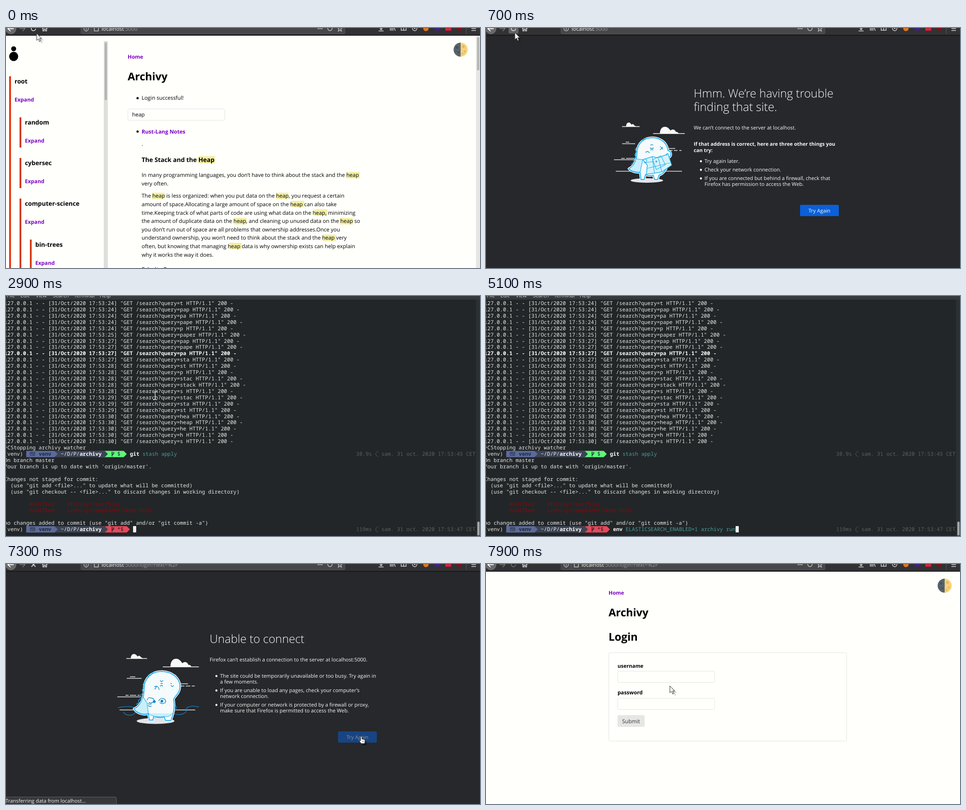
Recreate the animation shown at these times as an HTML page. Size 1052 by 532 pixels, loop 8000 ms.

```html
<!DOCTYPE html>
<html lang="en">
<meta charset="utf-8">
<title>Archivy session</title>
<style>
html, body { margin: 0; width: 100%; height: 100%; overflow: hidden; background: #27282b }
svg { display: block; width: 1052px; height: 532px }
text { font-family: "Open Sans", "Noto Sans", sans-serif; white-space: pre; text-rendering: geometricPrecision }
.mono { font: 500 11.625px "Noto Sans Mono", "DejaVu Sans Mono", monospace }
.mono.b { font-weight: 700 }
</style>
<svg id="stage" viewBox="0 0 1052 532"></svg>
<script>
const INK = '#000', PURPLE = '#7a00c4', PAPER = '#fffffc', DARK = '#27282b', WHITE = '#f9f9fa', BLUE = '#22b1ee';
const CELL = 6.975, ROW = 13.92;

const text = (x, y, size, str, fill = INK, weight = 400, more = '') =>
  `<text x="${x}" y="${y}" font-size="${size}" font-weight="${weight}" fill="${fill}" ${more}>${str}</text>`;
const rect = (x, y, w, h, fill, more = '') =>
  `<rect x="${x}" y="${y}" width="${w}" height="${h}" fill="${fill}" ${more}/>`;
const dot = (x, y, r, fill, more = '') => `<circle cx="${x}" cy="${y}" r="${r}" fill="${fill}" ${more}/>`;
const path = (d, stroke, width = 1, fill = 'none', more = '') =>
  `<path d="${d}" stroke="${stroke}" stroke-width="${width}" fill="${fill}" ${more}/>`;
const group = (id, body) => `<g id="${id}">${body}</g>`;
const field = (x, y, w, h) => rect(x + .5, y + .5, w - 1, h - 1, PAPER, 'rx="3" stroke="#e2e4e4"');

// ---------- light pages ----------
const moon = x => `<g transform="translate(${x} 48)">` + dot(0, 0, 15.6, '#f6d37c') +
  path('M0-15.6A15.6 15.6 0 0 0 0 15.6Z', 'none', 0, '#58636d') +
  [[-8, -5, 3], [-5, 6, 2.5], [-11, 3, 1.5]].map(([a, b, r]) => dot(a, b, r, '#46515b')).join('') +
  [[6, -7, 3], [9, 4, 2.3], [4, 9, 2]].map(([a, b, r]) => dot(a, b, r, '#e5b95c')).join('') + '</g>';

function folder(x, y, name, height) {
  return rect(x, y, 4, height, x < 10 ? '#e8340c' : '#d63c14') +
    text(x + 12, y + 16, 13.65, name, INK, 700) + text(x + 12, y + 55.5, 11.75, 'Expand', PURPLE, 700);
}

const marks = [[756, 319, 29], [324, 365, 28], [599, 365, 28], [633, 383, 29], [684, 402, 29], [506, 421, 28],
  [741, 421, 29], [703, 458, 29], [495, 476, 28]];
const notes = [
  [330, 'In many programming languages, you don’t have to think about the stack and the heap'],
  [348.5, 'very often.'],
  [376.3, 'The heap is less organized: when you put data on the heap, you request a certain'],
  [395, 'amount of space.Allocating a large amount of space on the heap can also take'],
  [413.5, 'time.Keeping track of what parts of code are using what data on the heap, minimizing'],
  [432, 'the amount of duplicate data on the heap, and cleaning up unused data on the heap so'],
  [450.7, 'you don’t run out of space are all problems that ownership addresses.Once you'],
  [469.3, 'understand ownership, you won’t need to think about the stack and the heap very'],
  [488, 'often, but knowing that managing heap data is why ownership exists can help explain'],
  [506.5, 'why it works the way it does.']];

const searchPage = rect(0, 16, 1052, 516, PAPER) +
  dot(17, 46, 5.5, INK) + '<ellipse cx="17" cy="63" rx="10" ry="10.3"/>' +
  folder(7, 107, 'root', 425) + folder(30, 198, 'random', 67) + folder(30, 288, 'cybersec', 67) +
  folder(30, 378, 'computer-science', 154) + folder(53, 469, 'bin-trees', 63) +
  rect(217, 29, 9, 503, '#dededb') + rect(219, 32, 5, 128, '#b4b4b2', 'rx="2.5"') +
  rect(1043, 17, 9, 515, '#e6e6e4') + rect(1045.5, 20, 5, 74, '#b4b4b2', 'rx="2.5"') +
  moon(1009) + text(270, 67.5, 11.65, 'Home', PURPLE, 700) + text(270, 116, 23.7, 'Archivy', INK, 700) +
  dot(292, 155.5, 2.5, INK) + text(301, 159, 11.9, 'Login successful!') +
  field(270, 179, 216, 26) + text(280, 196, 11.9, 'heap') +
  dot(292, 229.5, 2.5, INK) + text(301, 233.5, 11.87, 'Rust-Lang Notes', PURPLE, 700) + text(301, 261, 11.9, '.') +
  rect(427, 284, 37, 16, '#f3efa4') + text(301, 297, 13.75, 'The Stack and the Heap', INK, 700) +
  marks.map(([x, y, w]) => rect(x, y, w, 14.5, '#f3efa4')).join('') +
  notes.map(([y, s]) => text(301, y, 11.94, s)).join('') +
  text(301, 539, 11.8, 'Priority Queue', PURPLE, 700);

const loginPage = rect(0, 16, 1052, 516, PAPER) + moon(1018) +
  text(272, 67.5, 11.65, 'Home', PURPLE, 700) + text(272, 116, 23.7, 'Archivy', INK, 700) +
  text(272, 169.5, 23.9, 'Login', INK, 700) + field(272, 196, 529, 197) +
  text(292, 229.5, 11.4, 'username', INK, 700) + field(292, 237, 216, 26) +
  text(292, 289, 11.65, 'password', INK, 700) + field(292, 297, 216, 26) +
  rect(292, 335, 60, 26, '#e6e6e4', 'rx="3"') + text(302, 352.5, 12, 'Submit', '#333');

// ---------- error pages ----------
const cloud = (x, y, w, bx, bw, h) => path(`M${x} ${y}h${w}`, WHITE, 1.6) +
  path(`M${bx} ${y}c0-${h * .7} ${bw * .12}-${h} ${bw * .28}-${h}s${bw * .24} ${h * .4} ${bw * .3} ${h * .55}c${bw * .1}-${h * .3} ${bw * .26}-${h * .1} ${bw * .28} ${h * .2}q${bw * .14} 0 ${bw * .14} ${h * .25}z`, 'none', 0, WHITE);
const streaks = d => path(d, '#e4e4e6', 1.4);
const outlined = d => path(d, WHITE, 5, WHITE, 'stroke-linejoin="round"') + path(d, BLUE, 2, '#f5fafc', 'stroke-linejoin="round"');
const shadow = (x, y, rx, ry) => `<ellipse cx="${x}" cy="${y}" rx="${rx}" ry="${ry}" fill="#e3e4e8"/>`;
const button = (id, x, y) => group(id, rect(x, y, 86, 25, '#0a60d8', 'rx="2"') +
  text(x + 43, y + 16.7, 11.4, 'Try Again', WHITE, 400, 'text-anchor="middle"'));
const bullet = (x, y, lines) => dot(x - 8, y - 3.6, 2.3, WHITE) +
  lines.map((s, i) => text(x, y + i * 13.2, 11.35, s, WHITE)).join('');

const mapReader = cloud(302, 218.5, 39, 311, 21, 9) + cloud(371, 234, 70, 386, 41, 15) +
  streaks('M302 256.5h29M310 253h8M284 292h46M300 289h8m3 0h18M288 317.5h40M392 317.5h43M398 267h22M402 271.5h12m3 0h8m4 0h5') +
  shadow(357, 338, 36, 5) +
  outlined('M336 268C340 252 353 243 370 243C389 244 402 255 404 272C412 273 413 284 405 288L400 312C394 322 388 326 384 326L381 336H374L371 326Q362 329 354 325L351 336H344L342 320C332 321 322 318 317 312C326 307 332 300 333 290C336 282 334 276 336 268Z') +
  path('M333 290C331 301 325 308 317 312C324 318 333 320 342 319L348 292Z', BLUE, 1.2, '#c9effb') +
  path('M335 264l-4 5 3 5-4 7 3 5-6 6 1 5-6 6M346 251l2-4 6-1 2-4', BLUE, 1.4) +
  path('M348 292L369 285 382 288 404 279 412 304 390 319 372 322 356 324 358 304Z', BLUE, 1.5, '#d5f3fc') +
  path('M370 292l18-9 10 20-20 11zM369 286l5 36M383 290l7 28M351 299l21-3M358 311l50-12M350 292q3-4 7 1-1 6-6 5M404 279q-5-2-3 4', BLUE, 1.2) +
  path('M365 260q3-3 6 0M365 265v2h6v-2M365 271q3-3 6 0M386 263l5 3-5 4M392 264q-2 2 0 5M354 276q5-5 9 1', '#178fc7', 1.4) +
  dot(378, 296, 2, BLUE);

const plugHolder = cloud(267, 209.5, 46, 277, 26, 10) + cloud(348, 228, 80, 365, 46, 18) +
  streaks('M268 253.5h33M275 250h12M247 294.5h52M265 291h7m3 0h14m3 0h5M252 323.5h168M380 265.5h24M384 270.5h12m3 0h10m3 0h7') +
  shadow(332, 348, 42, 6.5) +
  path('M248 319C258 316 286 312 289 324C288 338 264 338 261 328M369 307C390 321 369 324 374 332C388 337 405 330 400 320Q409 312 428 317M370 250q1-6 8-4M374 255q3-4 7-3', '#167fc2', 1.3) +
  outlined('M308 264C314 247 328 238 346 238C370 239 387 254 386 273C385 288 375 292 372 300C375 316 372 330 368 341L366 347H354L351 339Q340 343 328 337L326 346H318L316 332C304 336 290 331 284 321C295 316 301 308 304 296C308 284 305 273 308 264Z') +
  path('M304 294C300 309 294 317 284 321C292 331 305 335 316 331L313 308Z', BLUE, 1.2, '#c9effb') +
  path('M316 331Q326 341 350 338Q364 340 369 331', BLUE, 1, '#c9effb') +
  path('M308 262l-4 5 3 6-5 6 3 6-6 6 2 6-7 5 1 6-6 3M315 251l1-5 6 0 2-5 6 1', BLUE, 1.4) +
  path('M342 258l3 3 4-3M343 265h5M342 271q3-4 6 0M366 269q4 5 6 0M365 264l3 2M329 272q9-4 11 7M330 278l4-6M313 302q2-8 9-5 7 1 7 6-5 7-12 4M339 304q2-7 9-6 8 2 6 9-7 5-13 0M315 313q3 4 8 2M315 309q3 3 8 1', '#178fc7', 1.4) +
  dot(329, 305, 3, '#167fc2') + dot(346, 304, 3, '#167fc2');

const notFound = rect(0, 16, 1052, 516, DARK) + mapReader +
  text(461, 154, 25.6, 'Hmm. We’re having trouble', WHITE, 300) + text(461, 184, 25.8, 'finding that site.', WHITE, 300) +
  text(461, 225, 11.4, 'We can’t connect to the server at localhost.', WHITE) +
  text(461, 261.3, 11.1, 'If that address is correct, here are three other things you', WHITE, 700) +
  text(461, 274.5, 11.1, 'can try:', WHITE, 700) +
  bullet(485, 299, ['Try again later.']) + bullet(485, 318, ['Check your network connection.']) +
  bullet(485, 337, ['If you are connected but behind a firewall, check that', 'Firefox has permission to access the Web.']) +
  button('retry', 697, 392);

const unable = rect(0, 16, 1052, 516, DARK) + plugHolder +
  text(452, 175, 25.5, 'Unable to connect', WHITE, 300) +
  text(452, 215.5, 11.35, 'Firefox can’t establish a connection to the server at localhost:5000.', WHITE) +
  bullet(475, 252, ['The site could be temporarily unavailable or too busy. Try again in', 'a few moments.']) +
  bullet(475, 284, ['If you are unable to load any pages, check your computer’s', 'network connection.']) +
  bullet(475, 316, ['If your computer or network is protected by a firewall or proxy,', 'make sure that Firefox is permitted to access the Web.']) +
  button('again', 737, 371) +
  group('status', rect(-2, 516.5, 247, 18, '#38383b', 'rx="2" stroke="#626265"') +
    text(-1, 528.5, 11.3, 'Transferring data from localhost…', WHITE));

// ---------- browser toolbar ----------
const icons = path('M827 6.5h11M832.5-2v6m-3-3l3 3 3-3M853-2v8m3-8v8m3-8v8m2-8l3 8M877-2v7h11v-7M882.5 0v5M1033 5.5h10M1033 1h10', '#d7d7db', 1.5) +
  dot(907, 1, 5, 'none', 'stroke="#d7d7db" stroke-width="1.4"') + dot(907, 0, 2, '#d7d7db') +
  dot(932, 1, 6, '#e2761b') + dot(957, 0, 6, '#3f1fa0') + rect(975, -5, 13, 11, '#d4213d') + dot(1006, 0, 6, '#8c0a14') +
  rect(1021, 0, 1, 13, '#5c5c5e') +
  [693, 697, 701].map(x => dot(x, 1.5, 1.3, '#c8c8cc')).join('') + dot(719, 1, 4.8, 'none', 'stroke="#c8c8cc" stroke-width="1.5"') +
  path('M735-1l4 3-1.5 5 3.5-2.5 3.5 2.5-1.5-5 4-3', '#c8c8cc', 1.4);
const address = (x, tail) => text(x, 6, 11.85, `localhost<tspan fill="#9b9b9f">${tail}</tspan>`, WHITE);
const secure = path('M173-2v3q0 4 5 6 5-2 5-6v-3M178-2v6', '#b8b8bc', 1.4) + rect(189, 0, 1, 12, '#636366') + path('M196-2v8.5h9v-8.5', '#c8c8cc', 1.5);
const toolbar = rect(0, 0, 1052, 16, '#323234') + rect(0, 15.5, 1052, 1.5, '#101012') +
  rect(166.5, -8, 585.5, 20.5, '#474749', 'rx="2" stroke="#5b5b5d"') +
  dot(11, 1.5, 12, '#69696b') + path('M4 1.5h13M10-4l-6 5.5 6 5.5', WHITE, 1.8) +
  path('M30 1.5h12M37-4l5 5.5-5 5.5', '#77777a', 1.7) +
  rect(50, -6, 22, 18, '#616163', 'id="hover" rx="2"') +
  path('M66 1.5a5 5 0 1 1-2-4.5M62-1h5v-4', '#d7d7db', 1.7, 'none', 'id="reload"') +
  path('M56.5-3l9 9m0-9l-9 9', '#d7d7db', 1.8, 'none', 'id="stop"') +
  path('M80 1l6-6 6 6M82 0v6.5h2.5v-4h3v4h2.5v-6.5', '#d7d7db', 1.6) + icons +
  group('urlHome', secure + address(212, ':5000')) +
  group('urlError', dot(178, 1.5, 5, 'none', 'stroke="#c8c8cc" stroke-width="1.2"') + rect(177.3, 0, 1.4, 4.5, '#c8c8cc') + address(190, ':5000')) +
  group('urlLogin', secure + address(212, ':5000/login?next=%2F'));

// ---------- terminal ----------
const FG = '#e6e9e4';
const col = c => -4 + CELL * c;
const mono = (c, row, str, fill = FG, bold = false) =>
  `<text class="mono${bold ? ' b' : ''}" x="${col(c)}" y="${20 + ROW * row}" fill="${fill}">${str}</text>`;

function prompt(row, flag, fill, took, clock) {
  const y = 9.2 + ROW * row, end = 37 + flag.length, dim = '#5a6062';
  const arrow = (a, b, f) => path(`M${col(a)} ${y}H${col(b)}l7 7-7 7H${col(a)}z`, 'none', 0, f);
  return mono(0, row, '(venv)') + arrow(30, end, fill) + arrow(15, 32, '#3d4354') + arrow(7, 16, '#5b6a9e') +
    path(`M54 ${y + 3}h10v7h-10zM54 ${y + 6}h10M57.5 ${y + 3}v3m3 0v4`, '#242a33', 1) +
    mono(11, row, 'venv', '#20262e', true) + mono(18, row, '~/D/P/', '#eef0ee') + mono(24, row, 'archivy', '#fff', true) +
    path(`M235.5 ${y + 1.5}v11M235.5 ${y + 8.5}q4-1 4-6`, '#20262e', 1.7) + mono(36, row, flag, '#20262e') +
    mono(112, row, took, dim) + path(`M826 ${y}l-6.5 7 6.5 7`, dim) + mono(120, row, `sam. 31 oct. 2020 17:53:${clock} CET`, dim);
}

const requests = '24t 24pap 24pa 24pape 24p 25paper 27pap 27pape 27pa 27sta 28st 28p 28stac 28stack 28s 29stac 29sta 29st 30hea 30heap 30he 30h 30s'.split(' ');
const CMD = '#46a09a', CHANGED = '#9a0006';
const terminal = rect(0, 0, 1052, 532, '#222628') + rect(0, 0, 1052, 8, '#343a3c') +
  [[2, 'File'], [32, 'Edit'], [66, 'View'], [104, 'Search'], [151, 'Terminal'], [208, 'Help']]
    .map(([x, s]) => text(x, 3, 11.3, s, '#d5d9d3')).join('') +
  requests.map((r, i) => mono(0, i, `127.0.0.1 - - [31/Oct/2020 17:53:${r.slice(0, 2)}] "GET /search?query=${r.slice(2)} HTTP/1.1" 200 -`,
    i == 8 ? '#fff' : FG, i == 8)).join('') +
  mono(0, 23, '^CStopping archivy watcher') +
  prompt(24, '$', '#5bf778', '38.9s', 45) + mono(40, 24, 'git', '#fff', true) + mono(44, 24, 'stash apply', CMD) +
  mono(0, 25, 'On branch master') + mono(0, 26, "Your branch is up to date with 'origin/master'.") +
  mono(0, 28, 'Changes not staged for commit:') +
  mono(2, 29, '(use "git add &lt;file>..." to update what will be committed)') +
  mono(2, 30, '(use "git checkout -- &lt;file>..." to discard changes in working directory)') +
  mono(8, 32, 'modified:   archivy/search.py', CHANGED) + mono(8, 33, 'modified:   archivy/templates/home.html', CHANGED) +
  mono(0, 35, 'no changes added to commit (use "git add" and/or "git commit -a")') +
  prompt(36, '*$', '#e8475a', '119ms', 47) +
  group('command', mono(41, 36, 'env', '#fff', true) + mono(45, 36, 'ELASTICSEARCH_ENABLED=1 archivy run', CMD)) +
  rect(0, 510, 7, 14, '#eef0ee', 'id="caret"') +
  rect(1043, 8, 9, 524, '#2b3032') + rect(1046, 500, 5, 31, '#a3a7a7', 'rx="2.5"');

// ---------- pointer ----------
const ARROW = 'M0 0V15.5L3.7 12.3 6.3 18.2 8.8 17.1 6.3 11.4H11Z';
const HAND = 'M-2 1q1.5-2 3 0v5l5 1q2 .5 2 3l-1 6H-1l-4-6q0-2 3 0z';
const pointer = group('arrow', path(ARROW, 'none', 0, '#000', 'opacity=".17" transform="translate(5 4)"') + path(ARROW, '#333', 1, '#f1f1f1')) +
  group('hand', path(HAND, 'none', 0, '#000', 'opacity=".35" transform="translate(4 4)"') + path(HAND, '#222', 1, '#fff') + path('M2.5 9v4m2.5-4v4', '#555', .8)) +
  group('beam', path('M-4-9q4 0 4 2 0-2 4-2M0-7V7M-4 9q4 0 4-2 0 2 4 2', '#e8e8e8', 1.3));

const stage = document.getElementById('stage');
stage.innerHTML = group('search', searchPage) + group('missing', notFound) + group('unable', unable) +
  group('login', loginPage) + group('toolbar', toolbar) + group('terminal', terminal) + group('pointer', pointer);

const el = {};
stage.querySelectorAll('[id]').forEach(e => el[e.id] = e);
const show = (id, on) => el[id].style.display = on ? '' : 'none';

// time, x, y
const track = [[200, 68, 12], [400, 64, 10], [800, 64, 10], [1200, 370, 305], [1600, 19, 12], [1700, 33, 12], [1900, 53, 10],
  [2100, 53, 10], [2400, 331, 221], [5900, 331, 221], [6000, 721, 409], [6100, 721, 409], [6200, 819, 409],
  [6300, 819, 409], [6600, 789, 382], [7500, 789, 382], [7600, 681, 374], [7700, 681, 374], [7800, 470, 302], [7900, 408, 270]];

function pointerAt(t) {
  const i = track.findIndex(k => k[0] > t);
  if (i < 1) return (i ? track[track.length - 1] : track[0]).slice(1);
  const [t0, x0, y0] = track[i - 1], [t1, x1, y1] = track[i], k = (t - t0) / (t1 - t0);
  return [x0 + (x1 - x0) * k, y0 + (y1 - y0) * k];
}

function draw(now) {
  const t = Math.floor(now % 8000 / 100) * 100;
  const within = (a, b) => t >= a && t < b;
  const term = within(2700, 5600), [x, y] = pointerAt(t);

  show('search', t < 700);
  show('missing', within(700, 2200));
  show('unable', within(2200, 2700) || within(5600, 7400));
  show('login', t >= 7400);
  show('terminal', term);
  show('toolbar', !term);

  show('urlHome', t < 700);
  show('urlError', within(700, 7200));
  show('urlLogin', t >= 7200);
  show('hover', y < 12 && x > 50 && x < 72);
  show('stop', within(6900, 7400));
  show('reload', !within(6900, 7400));
  el.reload.style.opacity = t >= 7400 ? .35 : 1;
  el.again.style.opacity = t >= 6900 ? .5 : 1;
  show('status', t >= 7000);

  const typed = within(4400, 4900) || t >= 5100;
  show('command', typed);
  el.caret.setAttribute('x', col(typed ? 80 : 41));

  const hand = within(6600, 7400);
  show('pointer', !within(4100, 5800));
  show('beam', term);
  show('hand', hand);
  show('arrow', !term && !hand);
  el.pointer.setAttribute('transform', `translate(${x} ${y})`);
}

const start = performance.now();
(function tick() {
  draw(performance.now() - start);
  requestAnimationFrame(tick);
})();
</script>
</html>
```
